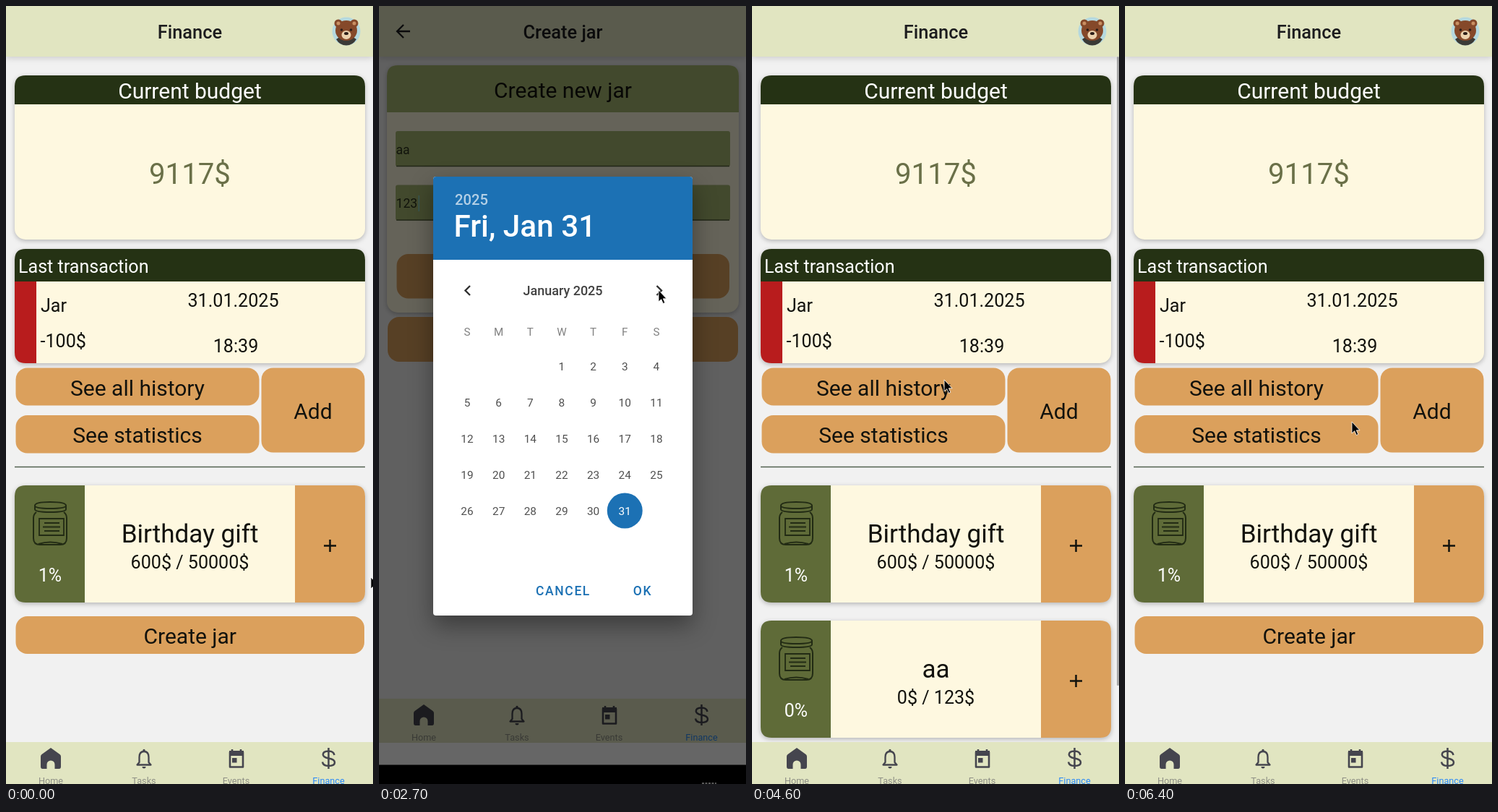
An HTML page for the animation above (6500 ms loop, 508 px wide and 1076 px high).

```html
<!DOCTYPE html>
<html lang="en">
<head>
<meta charset="utf-8">
<title>Savings jar</title>
<style>
  html, body { margin: 0; width: 100%; height: 100%; overflow: hidden; background: #f1f1f1; }
  svg { display: block; width: 100%; height: 100%; font-family: Roboto, sans-serif; }
  text { white-space: pre; }
  .card { filter: drop-shadow(0 2px 3px rgba(0, 0, 0, .25)); }
  .bar { filter: drop-shadow(0 2px 4px rgba(0, 0, 0, .16)); }
  .dialog { filter: drop-shadow(0 14px 16px rgba(0, 0, 0, .38)); }
</style>
</head>
<body>
<svg id="stage" viewBox="0 0 508 1076" xmlns="http://www.w3.org/2000/svg"></svg>
<script>
const LOOP = 6500, STEP = 100;
const C = {
  page: '#f1f1f1', bar: '#e1e5c1', cream: '#fef8e0', dark: '#253214', olive: '#5f6b38',
  green: '#a6b670', orange: '#dba05c', red: '#b81c1d', ink: '#12120d', icon: '#45454e', blue: '#1c71b4'
};

// Text is placed by the middle of its capitals.
const text = (x, cy, size, str, { fill = C.ink, anchor = 'middle', weight = 400, extra = '' } = {}) =>
  `<text x="${x}" y="${(cy + size * .356).toFixed(1)}" font-size="${size}" fill="${fill}" text-anchor="${anchor}" font-weight="${weight}" ${extra}>${str}</text>`;

const box = (x, y, w, h, fill, r = 0) =>
  `<rect x="${x}" y="${y}" width="${w}" height="${h}" rx="${r}" fill="${fill}"/>`;

const corners = (x, y, w, h, fill, [tl, tr, br, bl]) =>
  `<path fill="${fill}" d="M${x + tl} ${y}h${w - tl - tr}q${tr} 0 ${tr} ${tr}v${h - tr - br}q0 ${br} ${-br} ${br}h${-(w - br - bl)}q${-bl} 0 ${-bl} ${-bl}v${-(h - tl - bl)}q0 ${-tl} ${tl} ${-tl}z"/>`;

const line = (d, stroke, width, extra = '') =>
  `<path d="${d}" fill="none" stroke="${stroke}" stroke-width="${width}" ${extra}/>`;

const button = (x, y, w, h, label, r = 16) =>
  box(x, y, w, h, C.orange, r) + text(x + w / 2, y + h / 2 + 1.5, 30, label);

const group = (id, content, extra = '') => `<g id="${id}" ${extra}>${content}</g>`;

const header = (title, side) =>
  `<g class="bar">${box(0, 0, 508, 70, C.bar)}</g>` +
  text(254.5, 36, 25.4, title, { weight: 500, fill: '#1c1c1e' }) + side;

const backArrow = line('M43 35H25M34 26L25 35L34 44', '#1c1c1e', 2.3);

const bear = `
  <circle cx="471" cy="35" r="19.5" fill="#b5d9df"/>
  <path d="M457 46Q471 36 485 46Q480 54.500 471 54.500Q462 54.500 457 46z" fill="#3b3a36"/>
  <g fill="#85492a"><circle cx="460" cy="24" r="5.500"/><circle cx="482" cy="24" r="5.500"/>
  <ellipse cx="471" cy="34" rx="15" ry="14"/></g>
  <g fill="#c98f62"><circle cx="460" cy="24" r="2.500"/><circle cx="482" cy="24" r="2.500"/></g>
  <ellipse cx="471" cy="40" rx="6.500" ry="6" fill="#ecd2ae"/>
  <g fill="#2b1d18"><circle cx="464.500" cy="33" r="1.800"/><circle cx="477.500" cy="33" r="1.800"/>
  <ellipse cx="471" cy="38" rx="3" ry="2"/></g>`;

const jarIcon = y => line(
  `M40 ${y}q0-5 21-5q22 0 22 5v5q0 4-22 4q-21 0-21-4zM40 ${y}q0 4 21 4q22 0 22-4` +
  `M42 ${y + 9}q-4 3-4 8v28q0 9 9 9h28q9 0 9-9v-28q0-5-4-8M45 ${y + 53}q16-5 33 0`, '#222b14', 2) +
  line(`M46 ${y + 18}h34v23h-34zM53 ${y + 24}h21M51 ${y + 29.5}h24M53 ${y + 35}h21`, '#222b14', 1.8);

const jarCard = (y, name, amount, percent) => `<g class="card">` +
  box(12, y, 485, 162, C.cream, 15) +
  corners(12, y, 97, 162, C.olive, [15, 0, 0, 15]) +
  corners(400, y, 97, 162, C.orange, [0, 15, 15, 0]) + `</g>` +
  jarIcon(y + 28) +
  text(61, y + 124, 25, percent, { fill: '#fff' }) +
  text(254.5, y + 66, 35.1, name) + text(254.5, y + 106, 25.1, amount) +
  line(`M440 ${y + 83.5}h17M448.500 ${y + 75}v17`, C.ink, 2.5);

const finance =
  box(0, 0, 508, 1076, C.page) +
  `<g class="card">${box(12, 96, 485, 227, C.cream, 15)}${corners(12, 96, 485, 40, C.dark, [15, 15, 0, 0])}</g>` +
  text(254.5, 117.5, 30, 'Current budget', { fill: '#fff' }) +
  text(254.5, 232, 40.2, '9117$', { fill: '#6a7048' }) +
  `<g class="card">${box(12, 336, 485, 158, C.cream, 15)}${corners(12, 336, 485, 45, C.dark, [15, 15, 0, 0])}` +
  corners(12, 381, 30, 113, C.red, [0, 0, 0, 15]) + `</g>` +
  text(17, 360, 25.1, 'Last transaction', { fill: '#fff', anchor: 'start' }) +
  text(48, 414.5, 25.1, 'Jar', { anchor: 'start' }) +
  text(47.5, 463, 25.1, '-100$', { anchor: 'start' }) +
  text(314.5, 407.5, 25.1, '31.01.2025') + text(318, 470, 25.1, '18:39') +
  button(13.5, 500.5, 337, 52, 'See all history') + button(13.5, 566, 337, 52.5, 'See statistics') +
  button(353.5, 500.5, 143, 117, 'Add') +
  line('M12 637.500H497', '#52604f', 1.6) +
  jarCard(663, 'Birthday gift', '600$ / 50000$', '1%') +
  group('newJar', jarCard(850, 'aa', '0$ / 123$', '0%')) +
  group('createButton', button(13.5, 844, 482.5, 52, 'Create jar')) +
  group('scrollbar', box(505, 70, 3, 870, '#a9a9a9', 1.5)) +
  header('Finance', bear);

const field = (y, id) =>
  box(23, y, 463, 49, C.green, 3) + line(`M24 ${y + 48.5}H485`, '#56613c', 1.4) +
  text(23.5, y + 25.5, 17.6, '', { anchor: 'start', extra: `id="${id}"` });

const create =
  box(0, 0, 508, 1076, C.page) +
  `<g class="card">${box(11, 82, 487, 342, C.cream, 15)}${corners(11, 82, 487, 65, C.green, [15, 15, 0, 0])}</g>` +
  text(254.5, 116, 30, 'Create new jar') +
  field(173, 'nameText') + field(247.5, 'amountText') +
  `<rect id="caret" width="1.800" height="22" fill="#8fd3c0"/>` +
  text(254.5, 324, 20.1, '', { extra: 'id="picked"' }) +
  button(24.5, 343, 460.5, 61.5, 'Pick date') + button(12, 430, 485, 62, 'Create jar') +
  header('Create jar', backArrow);

const details =
  box(0, 0, 508, 1076, C.page) +
  box(11, 82, 487, 263, C.cream, 13) + corners(11, 82, 487, 45, C.olive, [14, 14, 0, 0]) +
  text(254.5, 106.5, 30, 'aa') +
  text(254.5, 173.5, 30, 'Target amount: 123$') + text(254.5, 238, 30, 'Current amount: 0$') +
  text(254.5, 302.5, 30, 'Deadline: 05.04.2025') +
  line('M11 358H498M11 559H498', '#4b4f4b', 1.7) +
  button(12, 377.5, 241.5, 75, 'Update deadline') + button(255.5, 377.5, 241.5, 75, 'Delete Jar') +
  button(12, 465, 485, 75, 'Add to amount') +
  text(254.5, 594.5, 30, 'History') +
  header('Jar', backArrow);

const tabLabel = (x, label, fill = '#8f9086') => text(x, 1071.5, 12.7, label, { fill });
const nav =
  box(0, 1018, 508, 61, C.bar) +
  `<path fill="${C.icon}" d="M62 1026L74.500 1035Q76 1036 76 1038V1052Q76 1055 73.500 1055H67.500V1049A5.500 5.500 0 0 0 56.500 1049V1055H50.500Q48 1055 48 1052V1038Q48 1036 49.500 1035z"/>` +
  line('M181.500 1049.500H200.500L197.500 1046V1039Q197.500 1031 191 1031Q184.500 1031 184.500 1039V1046z', C.icon, 2.3, 'stroke-linejoin="round"') +
  `<path fill="${C.icon}" d="M189.300 1031v-1.500a1.700 1.700 0 0 1 3.400 0v1.500zM188.500 1052h5a2.500 2.500 0 0 1-5 0z"/>` +
  line('M310 1032h18v20.500h-18zM313 1028v4M325 1028v4', C.icon, 2.6, 'stroke-linejoin="round"') +
  box(309, 1030, 20, 7, C.icon) + box(313, 1040, 6.5, 6.5, C.icon) +
  line('M446.500 1026V1055M454.500 1036Q453.500 1030.500 446.500 1030.500Q438.800 1030.500 438.800 1035.300Q438.800 1039 446.500 1040.500Q455 1042 455 1046.300Q455 1051 446.500 1051Q439 1051 438 1045.500', C.icon, 2.5) +
  tabLabel(62, 'Home') + tabLabel(191, 'Tasks') + tabLabel(318.5, 'Events') + tabLabel(446.5, 'Finance', '#2b8af7');

const keyboard =
  box(0, 1019, 508, 31, '#fff') + box(0, 1049.5, 508, 27, '#000') +
  line('M447 1075H467', '#ddd', 2, 'stroke-dasharray="3 1.500"') + box(45, 1075, 14, 1, '#333');

const column = i => 122 + 43.65 * i;
const monthPage = month => {
  const first = new Date(2025, month, 1).getDay();
  const count = new Date(2025, month + 1, 0).getDate();
  const title = new Date(2025, month, 1).toLocaleString('en-US', { month: 'long' }) + ' 2025';
  let out = text(254.5, 393.5, 18, title, { weight: 500, fill: '#424242' });
  [...'SMTWTFS'].forEach((d, i) => out += text(column(i), 451, 15.2, d, { fill: '#828282' }));
  for (let day = 1; day <= count; day++) {
    const cell = first + day - 1, x = column(cell % 7), y = 498 + 50 * Math.floor(cell / 7);
    const key = `${month}-${day}`;
    const markable = key === '0-31' || key === '3-5';
    if (markable) out += `<circle id="mark${key}" cx="${x}" cy="${y}" r="24.500" fill="${C.blue}"/>`;
    out += text(x, y, 15.4, day, { fill: '#505050', extra: markable ? `id="day${key}"` : '' });
  }
  return `<g transform="translate(${month * 359} 0)">${out}</g>`;
};

const action = (x, label) =>
  text(x, 808.5, 17.5, label, { weight: 500, fill: C.blue, extra: 'letter-spacing="1.600"' });
const picker =
  box(0, 0, 508, 1076, 'rgba(0,0,0,.6)') +
  `<g class="dialog">${box(75, 236, 359, 607, '#fff', 4)}</g>` +
  corners(75, 236, 359, 115, C.blue, [4, 4, 0, 0]) +
  text(105, 267.5, 20.2, '2025', { anchor: 'start', weight: 500, fill: '#b4d0e6' }) +
  text(103.5, 304, 42.3, '', { anchor: 'start', weight: 500, fill: '#fff', extra: 'id="pickerDate"' }) +
  `<clipPath id="pages"><rect x="75" y="351" width="359" height="430"/></clipPath>` +
  `<g clip-path="url(#pages)">${group('months', [0, 1, 2, 3].map(monthPage).join(''))}</g>` +
  line('M126 387L119.500 393.500L126 400M384.500 387L391 393.500L384.500 400', '#303030', 2.4) +
  action(255, 'CANCEL') + action(365, 'OK');

const pointer = group('pointer',
  '<path d="M0 0V16L3.700 12.700L6.300 18.500L8.800 17.400L6.300 11.800H11z" fill="#000" stroke="#fff" stroke-width=".8"/>');

document.getElementById('stage').innerHTML =
  group('finance', finance) + group('create', create) + group('details', details) +
  group('keyboard', keyboard) + group('nav', nav) + group('picker', picker) + pointer;

const el = id => document.getElementById(id);
const ramp = (t, a, b) => Math.min(1, Math.max(0, (t - a) / (b - a)));
const ease = k => k * k * (3 - 2 * k);
const during = (t, inA, inB, outA, outB) => ease(ramp(t, inA, inB)) - ease(ramp(t, outA, outB));
const fade = (id, k) => {
  el(id).setAttribute('opacity', k);
  el(id).setAttribute('display', k > 0 ? 'inline' : 'none');
};

// Pointer stops: time, x, y.
const stops = [
  [0, 505, 790], [200, 300, 868], [300, 290, 868], [600, 120, 195], [1200, 118, 198], [1400, 115, 266],
  [1800, 118, 268], [2100, 250, 374], [2300, 258, 374], [2600, 387, 393], [3200, 387, 393], [3400, 384, 495],
  [3500, 384, 495], [3700, 364, 806], [3800, 362, 800], [4000, 327, 571], [4200, 262, 462], [4500, 262, 468],
  [4900, 288, 781], [5100, 270, 912], [5300, 268, 910], [5600, 255, 552], [5800, 372, 418], [6000, 370, 420],
  [6300, 314, 575], [6500, 314, 575]
];
function pointerAt(t) {
  const i = stops.findIndex((s, n) => n && t <= s[0]);
  const [a, b] = [stops[i - 1], stops[i]];
  const k = ease(ramp(t, a[0], b[0]));
  return [a[1] + (b[1] - a[1]) * k, a[2] + (b[2] - a[2]) * k];
}

function setField(id, value, hint) {
  el(id).textContent = value || hint;
  el(id).setAttribute('fill', value ? '#2b321d' : '#56623a');
}

function render(t) {
  fade('create', during(t, 250, 450, 4350, 4550));
  fade('details', during(t, 5150, 5350, 5850, 6050));

  const saved = t >= 4300 && t < 5900;
  fade('newJar', saved ? 1 : 0);
  el('createButton').setAttribute('transform', `translate(0 ${saved ? 187 : 0})`);
  fade('scrollbar', saved ? 1 - ramp(t, 4900, 5200) : 0);

  const typing = t >= 700 && t < 4400;
  fade('keyboard', typing ? 1 : 0);
  el('nav').setAttribute('transform', `translate(0 ${typing ? -60 : 0})`);

  const name = 'aa'.slice(0, t < 900 ? 0 : t < 1100 ? 1 : 2);
  const amount = '123'.slice(0, Math.max(0, Math.floor((t - 1600) / 100)));
  setField('nameText', name, 'Jar name');
  setField('amountText', amount, 'Target amount');
  const onAmount = t >= 1500;
  el('caret').setAttribute('x', 23.5 + (onAmount ? amount.length * 10 : name.length * 9.6) + (amount ? .8 : 0));
  el('caret').setAttribute('y', onAmount ? 262 : 187);
  fade('caret', typing ? 1 : 0);

  const chosen = t >= 3500;
  el('picked').textContent = 'Picked date: ' + (t >= 3700 ? '4/5/2025' : '1/31/2025');
  fade('picker', during(t, 2150, 2350, 3650, 3850));
  el('pickerDate').textContent = chosen ? 'Sat, Apr 5' : 'Fri, Jan 31';
  const page = [2750, 2950, 3150].reduce((sum, s) => sum + ease(ramp(t, s, s + 200)), 0);
  el('months').setAttribute('transform', `translate(${-359 * page} 0)`);
  [['0-31', !chosen], ['3-5', chosen]].forEach(([key, on]) => {
    fade('mark' + key, on ? 1 : 0);
    el('day' + key).setAttribute('fill', on ? '#fff' : '#505050');
  });

  el('pointer').setAttribute('transform', `translate(${pointerAt(t).join(' ')})`);
}

const start = performance.now();
function tick() {
  const t = (performance.now() - start) % LOOP;
  render(Math.floor(t / STEP) * STEP);
  requestAnimationFrame(tick);
}
tick();
</script>
</body>
</html>
```
